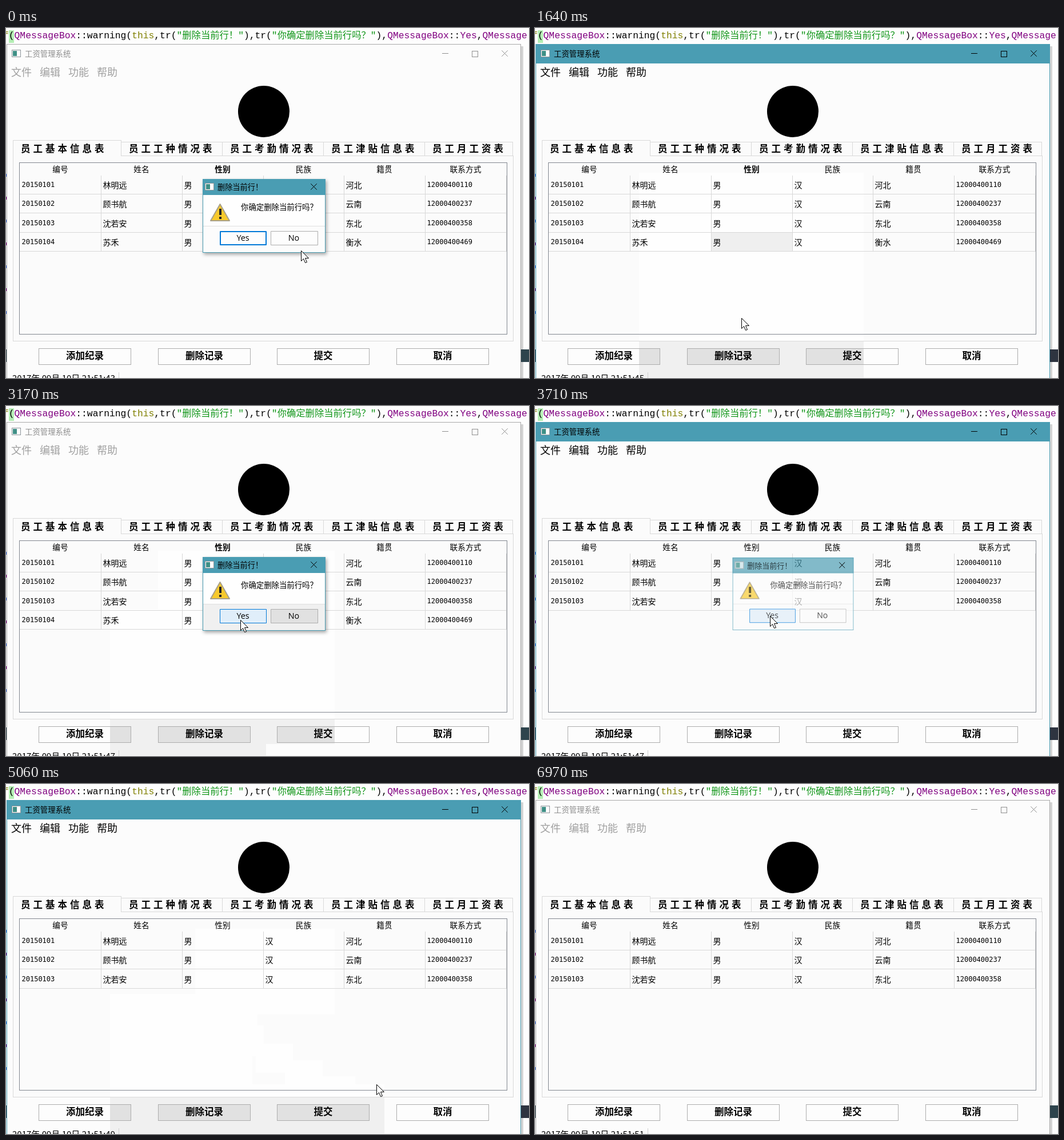
Write an HTML page with a canvas that moves like this. It is 915 by 612 pixels and loops after 7.07 s.

```html
<!DOCTYPE html>
<html lang="zh-CN">
<head>
<meta charset="utf-8">
<title>工资管理系统</title>
<style>
  html, body { margin: 0; width: 100%; height: 100%; overflow: hidden; background: #fdfdfd; }
  canvas { display: block; }
</style>
</head>
<body>
<canvas id="stage" width="915" height="612"></canvas>
<script>
const ctx = document.getElementById('stage').getContext('2d');
const LOOP = 7070, CAPTURE = 136.8, LEAD = 25;
const TEAL = '#4a9db3', BLUE = '#0078d7', LINE = '#d8d8d8';
const SANS = '"Noto Sans CJK SC", "Noto Sans CJK", sans-serif';
const DIALOG = '"Noto Sans CJK JP", "Noto Sans CJK SC", sans-serif';
const MONO = '"DejaVu Sans Mono", monospace';
const CODE = '"Liberation Mono", "Noto Sans CJK SC", monospace';

// Flat areas look pale at first and greyer where the screen was refreshed.
const PALE = { face: '#fcfcfc', pane: '#fbfbfb', button: '#fdfdfd', selected: '#fbfbfb' };
const FRESH = { face: '#f0f0f0', pane: '#fefefe', button: '#e1e1e1', selected: '#efefef' };

const FULL_REDRAWS = [0, 950, 2500, 3710, 6970];
const STOPS = [ // time, x, y of the pointer
  [0, 516, 389], [360, 518, 367], [1100, 518, 367], [1370, 414, 382], [1640, 361, 507],
  [1940, 370, 569], [2500, 370, 569], [3170, 411, 367], [4000, 411, 367], [4370, 434, 452],
  [4640, 535, 510], [4910, 648, 537], [5060, 648, 525], [5900, 648, 525], [6170, 670, 532],
  [6570, 730, 598]
];
const HOVERS = { No: [100, 1090], 删除记录: [1790, 2600], Yes: [3030, 3830], 取消: [6300, 6720] };
const CLICKS = [[800, 950], [2350, 2500], [3560, 3710]];
const COLUMNS = ['编号', '姓名', '性别', '民族', '籍贯', '联系方式'];
const PEOPLE = [['林明远', '河北', '12000400110'], ['顾书航', '云南', '12000400237'],
  ['沈若安', '东北', '12000400358'], ['苏禾', '衡水', '12000400469']];
const TABS = ['员工基本信息表', '员工工种情况表', '员工考勤情况表', '员工津贴信息表', '员工月工资表'];
const BUTTONS = ['添加纪录', '删除记录', '提交', '取消'];

const columnX = i => Math.round(24 + 141.85 * i);
const rowLine = i => Math.round(290 + 33.3 * i);
const tabX = i => i ? 24 + 177 * i : 12;
const buttonX = i => Math.round(57 + 208.6 * i);

// State at a given time
const within = (t, [from, to]) => t >= from && t < to;
const seconds = t => 43 + Math.floor((t + 900) / 983);
const isActive = t => within(t, [950, 2500]) || within(t, [3710, 6970]);
const hovered = t => Object.keys(HOVERS).find(name => within(t, HOVERS[name]));
const clicking = t => CLICKS.some(span => within(t, span));

function dialogPhase(t) {
  if ([[950, 1090], [2500, 2620], [3710, 3820]].some(span => within(t, span))) return 'fading';
  return t < 950 || within(t, [2620, 3710]) ? 'open' : 'closed';
}

function pointerAt(t) {
  const next = STOPS.findIndex(stop => stop[0] > t);
  if (next < 0) return STOPS[STOPS.length - 1].slice(1);
  const [t0, x0, y0] = STOPS[next - 1], [t1, x1, y1] = STOPS[next];
  const k = (t - t0) / (t1 - t0);
  return [Math.round(x0 + (x1 - x0) * k), Math.round(y0 + (y1 - y0) * k)];
}

function controlBox(name) {
  if (name === 'Yes') return [374, 355, 455, 379];
  if (name === 'No') return [463, 355, 545, 379];
  const x = buttonX(BUTTONS.indexOf(name));
  return [x, 560, x + 161, 588];
}

// Box around all that changed between two captures
function dirtyBox(before, now) {
  const boxes = [];
  const spots = [before, now].map(pointerAt);
  if (String(spots[0]) !== String(spots[1])) spots.forEach(([x, y]) => boxes.push([x, y, x + 14, y + 22]));
  if (seconds(before) !== seconds(now)) boxes.push([182, 600, 190, 611]);
  const hot = [before, now].map(hovered);
  if (hot[0] !== hot[1]) hot.filter(Boolean).forEach(name => boxes.push(controlBox(name)));
  if (dialogPhase(before) !== dialogPhase(now)) boxes.push([331, 253, 575, 403]);
  if (!boxes.length) return null;
  return [Math.min, Math.min, Math.max, Math.max].map((pick, i) => pick(...boxes.map(b => b[i])));
}

function refreshedBoxes(t) {
  const start = FULL_REDRAWS.filter(time => time <= t).pop() - 2 * LEAD;
  const boxes = [];
  for (let now = CAPTURE; now <= t + LEAD; now += CAPTURE) {
    const box = now - CAPTURE >= start && dirtyBox(now - CAPTURE, now);
    if (box) boxes.push(box);
  }
  return boxes;
}

// Drawing helpers
function fill(color, x, y, w, h) {
  ctx.fillStyle = color;
  ctx.fillRect(x, y, w, h);
}

function frame(x, y, right, bottom, border, color, weight = 1) {
  if (color) fill(color, x, y, right - x + 1, bottom - y + 1);
  ctx.strokeStyle = border;
  ctx.lineWidth = weight;
  ctx.strokeRect(x + weight / 2, y + weight / 2, right - x + 1 - weight, bottom - y + 1 - weight);
}

function text(str, x, y, font, color = '#000', align = 'left', spacing = 0) {
  ctx.font = font;
  ctx.fillStyle = color;
  ctx.textAlign = align;
  ctx.letterSpacing = spacing + 'px';
  ctx.fillText(str, x, y);
}

function path(points, color, border, weight = 1) {
  ctx.beginPath();
  points.forEach(([x, y]) => ctx.lineTo(x, y));
  ctx.closePath();
  ctx.fillStyle = color;
  ctx.fill();
  ctx.strokeStyle = border;
  ctx.lineWidth = weight;
  ctx.stroke();
}

function cross(x, y, color) {
  path([[x, y], [x + 10, y + 10]], color, color);
  path([[x + 10, y], [x, y + 10]], color, color);
}

function appIcon(x, y) {
  frame(x, y, x + 15, y + 12, '#8d9499', '#fff');
  fill('#3f8f86', x + 2, y + 2, 7, 9);
}

// Scene parts
function drawEditor(active) {
  fill('#fdfdfd', 0, 0, 915, 612);
  fill('#b4eeb4', 5, 4, 9, 22);
  const black = '#000', purple = '#800080', olive = '#808000', green = '#109618';
  let x = -5;
  [['f', olive], ['(', black], ['QMessageBox', purple], ['::warning(', black], ['this', olive],
    [',tr(', black], ['"删除当前行！"', green], ['),tr(', black], ['"你确定删除当前行吗？"', green],
    ['),', black], ['QMessageBox', purple], ['::', black], ['Yes', purple], [',', black], ['QMessage', purple]
  ].forEach(([token, color]) => {
    text(token, x, 14, '16.32px ' + CODE, color);
    x += ctx.measureText(token).width;
  });
  for (let i = 0; i < 7; i++) fill(i % 2 ? purple : '#3f6fe0', 0, 255 + 40 * i, 1, 5);
  fill('rgba(0,0,0,.16)', 901, 32, 4, 580);
  fill(active ? '#2e3440' : '#2e444d', 0, 562, 915, 22);
}

function drawWindow(active, look) {
  frame(1, 28, 900, 620, active ? TEAL : '#a9a9a9', look.face);
  if (active) fill(TEAL, 1, 28, 900, 34);
  const ink = active ? '#000' : '#8f8f8f';
  appIcon(10, 38);
  text('工资管理系统', 33, 45, '13.4px ' + SANS, ink);
  fill(ink, 763, 44, 11, 1);
  frame(815, 40, 825, 50, ink);
  cross(867.5, 39.5, ink);
  ['文件', '编辑', '功能', '帮助'].forEach((item, i) =>
    text(item, 9 + 50 * i, 77, '18px ' + SANS, active ? '#000' : '#a0a0a0'));
  ctx.fillStyle = '#000';
  ctx.beginPath();
  ctx.arc(451, 146, 45, 0, Math.PI * 2);
  ctx.fill();
}

function drawTabs(look) {
  frame(12, 223, 887, 547, '#d9d9d9', look.pane);
  TABS.forEach((label, i) => {
    frame(tabX(i), i ? 199 : 196, i < 4 ? tabX(i + 1) : 886, 223, '#d9d9d9', look.pane);
    text(label, tabX(i) + 14, 211, '600 16.5px ' + SANS, '#000', 'left', 5);
  });
  fill(look.pane, 13, 222, 188, 3);
}

function drawTable(t, look) {
  const beforeDelete = t < 3710;
  const people = PEOPLE.slice(0, beforeDelete ? 4 : 3);
  frame(23, 235, 876, 535, '#828790', look.pane);
  if (beforeDelete && isActive(t)) fill(look.selected, 309, 358, 141, 32);
  COLUMNS.forEach((label, i) => {
    const weight = i === 2 && beforeDelete ? 'bold ' : '';
    text(label, (columnX(i) + columnX(i + 1)) / 2, 247, weight + '13.7px ' + SANS, '#000', 'center');
    fill(LINE, columnX(i + 1), 258, 1, rowLine(people.length - 1) - 257);
  });
  people.forEach(([name, home, phone], r) => {
    fill(LINE, 24, rowLine(r), 852, 1);
    [String(20150101 + r), name, '男', '汉', home, phone].forEach((value, c) =>
      text(value, columnX(c) + 3.5, rowLine(r) - 15, /\d/.test(value) ? '12px ' + MONO : '14px ' + SANS));
  });
}

function drawControls(t, look) {
  BUTTONS.forEach((label, i) => {
    const hot = hovered(t) === label;
    const color = !hot ? look.button : within(t, [2350, 2600]) ? '#d0e4f1' : '#e5f1fb';
    frame(...controlBox(label), hot ? BLUE : '#adadad', color);
    text(label, buttonX(i) + 81, 573, '900 16.5px ' + SANS, '#000', 'center');
  });
  text('2017年 09月 10日 21:51:' + seconds(t), 11, 612, '15px ' + SANS);
  fill('#d0d0d0', 197, 602, 1, 10);
}

function drawChoice(t, name, look) {
  const hot = hovered(t) === name;
  const focused = name === 'Yes' && !within(t, [800, 1100]);
  const color = !hot ? look.button : clicking(t) ? '#d6e9f8' : '#e0eefa';
  const [x, ...rest] = controlBox(name);
  frame(x, ...rest, hot || focused ? BLUE : '#adadad', color, focused && !hot ? 2 : 1);
  text(name, x + 40.5, 368, '14.3px "Open Sans", sans-serif', '#000', 'center');
}

function drawDialog(t, look) {
  const phase = dialogPhase(t);
  if (phase === 'closed') return;
  ctx.save();
  if (phase === 'fading') {
    ctx.globalAlpha = 0.68;
    ctx.translate(451, 328);
    ctx.scale(0.985, 0.985);
    ctx.translate(-451, -328);
  } else {
    ctx.shadowColor = 'rgba(0,0,0,.35)';
    ctx.shadowBlur = 6;
    ctx.shadowOffsetX = 2;
    ctx.shadowOffsetY = 3;
  }
  // Regions do not overlap, so the fade stays even.
  ctx.beginPath();
  ctx.rect(344, 292, 215, 55);
  ctx.fillStyle = '#fefefe';
  ctx.fill();
  fill(look.face, 344, 347, 215, 46);
  fill(TEAL, 344, 264, 215, 28);
  ctx.shadowColor = 'transparent';
  if (phase === 'open') {
    fill('#fefefe', 344, 292, 215, 55);
    fill(look.face, 344, 347, 215, 46);
  }
  fill('#dfdfdf', 345, 346, 213, 1);
  frame(344, 264, 558, 392, TEAL);
  appIcon(348, 271);
  text('删除当前行！', 370, 278, '13.2px ' + DIALOG);
  cross(533.5, 272.5, '#000');
  ctx.lineJoin = 'round';
  path([[374.5, 308], [391, 337], [358, 337]], '#f7c92c', '#a8a08a', 2);
  fill('#222', 373, 316, 4, 11);
  fill('#222', 373, 330, 4, 4);
  text('你确定删除当前行吗？', 411, 313, '13.4px ' + DIALOG);
  ['Yes', 'No'].forEach(name => drawChoice(t, name, look));
  ctx.restore();
}

function drawScene(t, look) {
  drawEditor(isActive(t));
  drawWindow(isActive(t), look);
  drawTabs(look);
  drawTable(t, look);
  drawControls(t, look);
  drawDialog(t, look);
}

function drawPointer(t) {
  if (t >= 6720) return;
  const [x, y] = pointerAt(Math.floor((t + LEAD) / CAPTURE) * CAPTURE);
  if (clicking(t)) {
    ctx.strokeStyle = '#222';
    ctx.lineWidth = 1;
    ctx.beginPath();
    ctx.arc(x + 1, y + 1, 9, 0, Math.PI * 2);
    ctx.stroke();
  }
  const arrow = [[0, 0], [0, 18], [4, 14], [7, 21], [10, 20], [7, 13], [13, 13]];
  path(arrow.map(([dx, dy]) => [x + dx + 0.5, y + dy + 0.5]), '#fff', '#000');
}

function render() {
  const t = performance.now() % LOOP;
  ctx.textBaseline = 'middle';
  drawScene(t, PALE);
  const boxes = refreshedBoxes(t);
  if (boxes.length) {
    ctx.save();
    ctx.beginPath();
    boxes.forEach(([x, y, right, bottom]) => ctx.rect(x, y, right - x, bottom - y));
    ctx.clip();
    drawScene(t, FRESH);
    ctx.restore();
  }
  drawPointer(t);
  requestAnimationFrame(render);
}
render();
</script>
</body>
</html>
```
